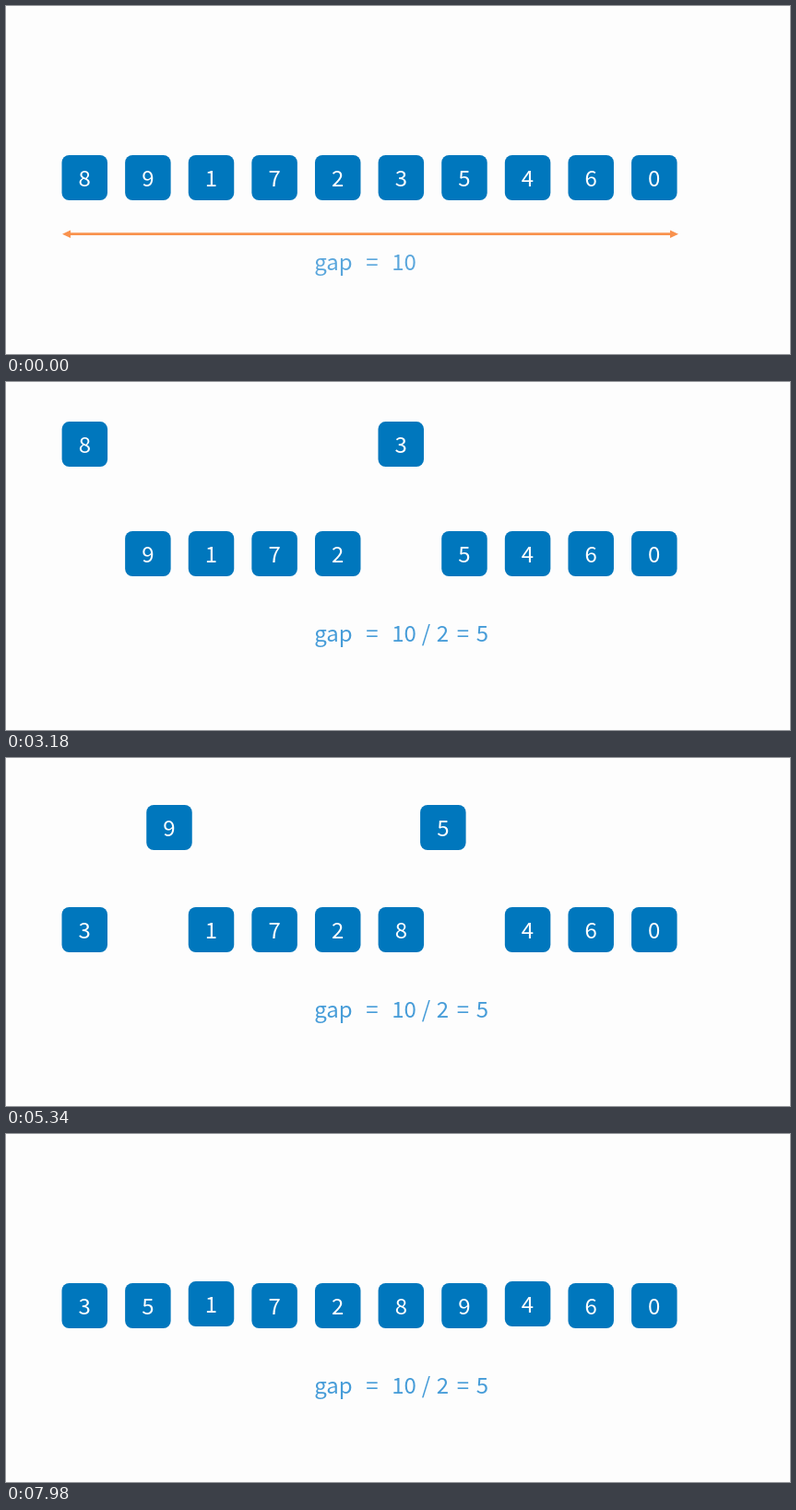
An HTML page for the animation above (8000 ms loop, 850 by 378 pixels).

```html
<!DOCTYPE html>
<html lang="en">
<head>
<meta charset="utf-8">
<title>Gap sort</title>
<style>
  html, body { margin: 0; width: 100%; height: 100%; overflow: hidden; background: #fdfdfd; }
  svg { display: block; width: 850px; height: 378px; }
  text { font: 300 24px "Noto Sans CJK SC", "Noto Sans CJK JP", "Noto Sans CJK", "Open Sans", sans-serif; text-anchor: middle; }
  .tile rect { fill: #0077bd; }
  .tile text { fill: #fff; }
  .label text { fill: #469cd8; }
  .arrow { fill: #f98537; }
</style>
</head>
<body>
<svg viewBox="0 0 850 378">
  <g id="tiles"></g>
  <g id="first" class="label">
    <path class="arrow" d="M61 242.3l9-4.2v2.8H720v-2.8l9 4.2l-9 4.2v-2.8H70v2.8z"/>
  </g>
  <g id="second" class="label"></g>
</svg>
<script>
const LOOP = 8000, SECOND = 877;   // one animation step lasts SECOND ms
const LEFT = 60.5, PITCH = 68.62, TOP = 162, LIFT = 119, FLOAT = 47.8;
const $ = id => document.getElementById(id);

function add(parent, tag, attrs, content = '') {
  const el = document.createElementNS('http://www.w3.org/2000/svg', tag);
  for (const key in attrs) el.setAttribute(key, attrs[key]);
  el.textContent = content;
  return parent.appendChild(el);
}

const tiles = [...'8917235460'].map(digit => {
  const g = add($('tiles'), 'g', { class: 'tile' });
  add(g, 'rect', { width: 49.5, height: 49, rx: 8 });
  add(g, 'text', { x: 24.7, y: 33.5 }, digit);
  return g;
});

const words = [['gap', 355], ['=', 397], ['10', 431.5], ['/', 455.5], ['2', 473.5], ['=', 495.5], ['5', 516.5]];
const write = (group, list) => list.forEach(([word, x]) => add(group, 'text', { x, y: 281.5 }, word));
write($('first'), words.slice(0, 3));
write($('second'), words);

// Each pair is lifted, then dropped, crossing over when swapped
const moves = [
  { a: 0, b: 5, rise: 2179, drop: 3170, swap: true },
  { a: 1, b: 6, rise: 4148, drop: 5180, swap: true },
  { a: 2, b: 7, rise: 6180, drop: 7182, swap: false }
];

const progress = (t, start) => Math.min(1, Math.max(0, (t - start) / SECOND));
const ease = u => u < .5 ? 2 * u * u : 1 - 2 * (1 - u) ** 2;

function floatLabel(el, shown) {
  el.setAttribute('opacity', shown);
  el.setAttribute('transform', `translate(0 ${FLOAT * (1 - shown)})`);
}

function place(i, slot, lift) {
  tiles[i].setAttribute('transform', `translate(${LEFT + PITCH * slot} ${TOP - LIFT * lift})`);
}

function draw(t) {
  floatLabel($('first'), t < 145 ? progress(t, -777) : 1 - progress(t, 190));
  floatLabel($('second'), progress(t, 1195));
  for (const { a, b, rise, drop, swap } of moves) {
    const down = ease(progress(t, drop));
    const lift = ease(progress(t, rise)) - down;
    const shift = swap ? (b - a) * down : 0;
    place(a, a + shift, lift);
    place(b, b - shift, lift);
  }
}

tiles.forEach((_, i) => place(i, i, 0));
const begin = performance.now();
function frame() {
  draw((performance.now() - begin) % LOOP);
  requestAnimationFrame(frame);
}
frame();
</script>
</body>
</html>
```
